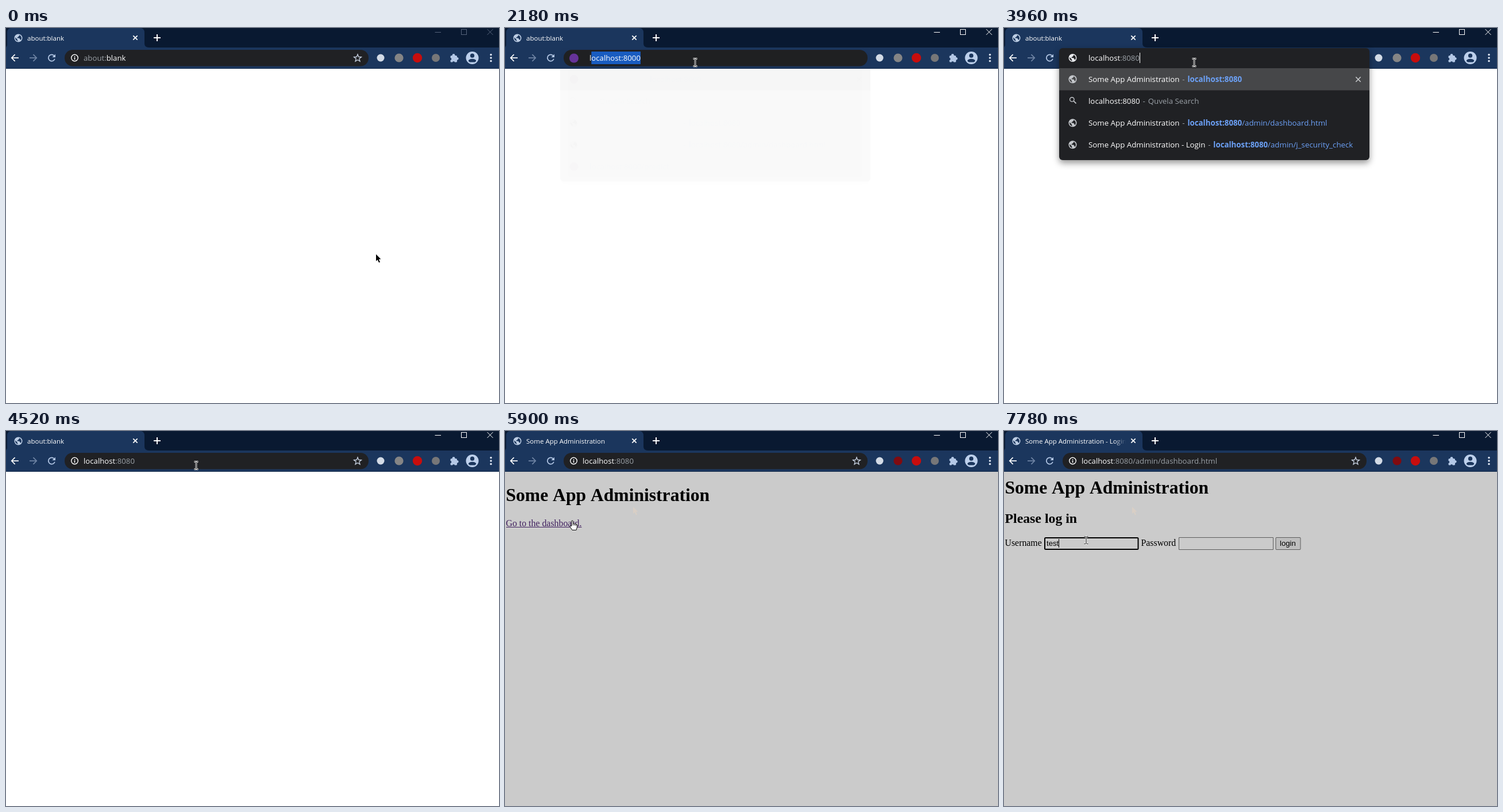
An HTML page with a canvas that plays this animation: 858 px wide and 653 px high, repeating every 8 s.

```html
<!DOCTYPE html>
<html lang="en">
<head>
<meta charset="utf-8">
<title>Browser login</title>
<style>
  html, body { margin: 0; width: 100%; height: 100%; overflow: hidden; background: #fff; }
  canvas { display: block; }
</style>
</head>
<body>
<canvas id="stage" width="858" height="653"></canvas>
<script>
const ctx = document.getElementById('stage').getContext('2d');
const LOOP = 8000;
const BAR = '#1b365d', DARK = '#202124', PAGE = '#cbcbcb';
const ICE = '#b4c8e6', GREY = '#9aa0a6', LINK = '#6ca1f7', PURPLE = '#663399';

const ui = (size, weight = 400) => `${weight} ${size}px "Open Sans", "Noto Sans", sans-serif`;
const serif = (size, weight = 400) => `${weight} ${size}px "Liberation Serif", serif`;
const sans = size => `${size}px "Liberation Sans", sans-serif`;
const URL_FONT = ui(13.2), ROW_FONT = ui(13.3), ROW_BOLD = ui(13.3, 700);

// ---- timeline ----
const ACTIVE = 300, SELECT = 1250, OPEN = 2180, FULL = 3960;
const ENTER = 4520, HOME = 4590, HOVER = 5740, LOGIN = 6300, FOCUS = 7200;
const KEYS = [[2180, 1], [2330, 2], [2500, 4], [2650, 5], [2970, 6], [3050, 7], [3130, 8],
  [3200, 9], [3430, 10], [3730, 11], [3810, 12], [FULL, 14]];
const USER_KEYS = [[7450, 1], [7530, 2], [7780, 4]];
const PATH = [[70, 644, 394], [860, 319, 67], [1100, 319, 67], [1250, 331, 60], [5280, 331, 60],
  [5440, 324, 58], [5740, 223, 132], [5900, 117, 156], [6690, 117, 156], [7150, 143, 190]];
const SHAPES = [[0, 'arrow'], [1170, 'beam'], [5480, 'arrow'], [5850, 'hand'], [6540, 'arrow'], [7000, 'beam']];

const latest = (list, t, none) => list.reduce((v, [at, val]) => t >= at ? val : v, none);
const clamp = v => Math.max(0, Math.min(1, v));

function pointer(t) {
  let i = PATH.findIndex(p => p[0] > t);
  if (i < 0) i = PATH.length;
  const a = PATH[Math.max(0, i - 1)], b = PATH[Math.min(i, PATH.length - 1)];
  let k = clamp((t - a[0]) / (b[0] - a[0] || 1));
  k = k * k * (3 - 2 * k);
  return [a[1] + (b[1] - a[1]) * k, a[2] + (b[2] - a[2]) * k];
}

// ---- drawing helpers ----
function text(s, x, y, color, font) {
  ctx.font = font;
  ctx.fillStyle = color;
  ctx.fillText(s, x, y);
  return x + ctx.measureText(s).width;
}
function box(x, y, w, h, color) {
  ctx.fillStyle = color;
  ctx.fillRect(x, y, w, h);
}
function round(x, y, w, h, r, color) {
  ctx.beginPath();
  ctx.roundRect(x, y, w, h, r);
  ctx.fillStyle = color;
  ctx.fill();
}
function disc(x, y, r, color) {
  ctx.beginPath();
  ctx.arc(x, y, r, 0, Math.PI * 2);
  ctx.fillStyle = color;
  ctx.fill();
}
function ring(x, y, r, color, width, from = 0, to = Math.PI * 2) {
  ctx.beginPath();
  ctx.arc(x, y, r, from, to);
  ctx.strokeStyle = color;
  ctx.lineWidth = width;
  ctx.stroke();
}
function shape(pts, x = 0, y = 0) {
  ctx.beginPath();
  for (let i = 0; i < pts.length; i += 2) ctx.lineTo(x + pts[i], y + pts[i + 1]);
}
function line(pts, color, width) {
  shape(pts);
  ctx.strokeStyle = color;
  ctx.lineWidth = width;
  ctx.stroke();
}
function cross(x, y, r, color, width) {
  line([x - r, y - r, x + r, y + r], color, width);
  line([x - r, y + r, x + r, y - r], color, width);
}

// ---- icons ----
function globe(x, y, color, land, scale = 1) {
  ctx.save();
  ctx.translate(x, y);
  ctx.scale(scale, scale);
  disc(0, 0, 7, color);
  ctx.fillStyle = land;
  shape([-5.6, -1.2, -2, 2, -1.6, 3.4, -0.6, 5.6, -3, 4.6, -5, 2.4]);
  ctx.fill();
  shape([1.4, -5.4, 4, -3.8, 5.4, -1, 5.2, 2, 3.8, 3.6, 2.6, 1.4, 1.6, 0.2, -2, 0, -1.6, -1.6, 0.2, -2, 0.4, -3.4, 1.8, -3.8]);
  ctx.fill();
  ctx.restore();
}
function info(x, y) {
  ring(x, y, 5.8, '#fff', 1.4);
  box(x - 0.8, y - 3, 1.6, 1.6, '#fff');
  box(x - 0.8, y - 0.6, 1.6, 3.8, '#fff');
}
function lens(x, y) {
  ring(x - 1.2, y - 1.4, 3.7, '#c4c7cb', 1.4);
  line([x + 1.6, y + 1.4, x + 6, y + 5.6], '#c4c7cb', 1.7);
}
function star(x, y) {
  ctx.beginPath();
  for (let i = 0; i < 10; i++) {
    const r = i % 2 ? 2.9 : 6.8, a = i * Math.PI / 5 - Math.PI / 2;
    ctx.lineTo(x + r * Math.cos(a), y + 0.6 + r * Math.sin(a));
  }
  ctx.closePath();
  ctx.strokeStyle = '#c8d2e2';
  ctx.lineWidth = 1.3;
  ctx.stroke();
}
function puzzle() {
  round(773.5, 48, 11.5, 11.5, 1.5, ICE);
  disc(779, 47.3, 2.4, ICE);
  disc(785.2, 53.3, 2.4, ICE);
  disc(773.4, 54, 1.9, BAR);
  disc(779, 59.8, 1.9, BAR);
}
function avatar() {
  disc(811.5, 52, 11, '#bdd0ec');
  disc(811.5, 48.2, 3.6, BAR);
  ctx.beginPath();
  ctx.ellipse(811.5, 57.4, 6.8, 3.6, 0, Math.PI, 0);
  ctx.lineTo(816, 59.5);
  ctx.lineTo(807, 59.5);
  ctx.fill();
}

// ---- browser window ----
function tabStrip(t) {
  box(0, 0, 858, 34, '#091931');
  ctx.beginPath();
  ctx.moveTo(0, 34);
  ctx.lineTo(2, 30);
  ctx.lineTo(2, 8);
  ctx.quadraticCurveTo(2, 0, 10, 0);
  ctx.lineTo(233, 0);
  ctx.quadraticCurveTo(241, 0, 241, 8);
  ctx.lineTo(241, 27);
  ctx.quadraticCurveTo(241, 34, 249, 34);
  ctx.fillStyle = BAR;
  ctx.fill();

  const shrunk = t >= HOME && t < HOME + 80 || t >= LOGIN && t < LOGIN + 80;
  globe(21.5, 17.5, '#bccde4', BAR, shrunk ? 0.85 : 1);
  const title = t < HOME ? 'about:blank' : 'Some App Administration' + (t < LOGIN ? '' : ' - Login');
  ctx.save();
  ctx.beginPath();
  ctx.rect(30, 0, 182, 34);
  ctx.clip();
  text(title, 37, 21.5, '#fff', ui(11.5));
  const fade = ctx.createLinearGradient(192, 0, 212, 0);
  fade.addColorStop(0, 'rgba(27,54,93,0)');
  fade.addColorStop(1, BAR);
  box(192, 5, 20, 25, fade);
  ctx.restore();

  cross(225, 17, 3.7, '#fff', 1.7);
  line([257, 17, 269, 17], '#fff', 2);
  line([263, 11, 263, 23], '#fff', 2);

  const tone = t < ACTIVE ? '#56637b' : '#fff';
  line([746.5, 7.5, 757, 7.5], tone, 1);
  ctx.strokeRect(792.5, 2.5, 9, 9);
  cross(842.5, 7, 5, tone, 1);
}

function toolbar(t) {
  box(0, 34, 858, 37, BAR);
  box(0, 70, 858, 1, '#142b4c');
  line([22, 52, 10, 52], '#fff', 1.7);
  line([15.6, 46.2, 9.8, 52, 15.6, 57.8], '#fff', 1.7);
  line([41, 52, 53, 52], '#7186a6', 1.7);
  line([47.4, 46.2, 53.2, 52, 47.4, 57.8], '#7186a6', 1.7);
  ring(79.5, 52, 5.6, ICE, 1.7, 0.3, 5.5);
  shape([86, 45.4, 86, 51, 80.4, 51]);
  ctx.fillStyle = ICE;
  ctx.fill();

  round(102, 38, 529, 28.5, 14, DARK);
  disc(652, 52, 6.5, '#d3dbe6');
  disc(684, 52, 7.6, t < HOME ? '#858585' : '#800b10');
  disc(716, 52, 8.2, '#c70d0d');
  disc(748, 52, 7, '#777778');
  puzzle();
  avatar();
  for (const y of [46.5, 52, 57.5]) disc(844, y, 1.7, '#e6edf7');
}

function address(t, typed) {
  const y = 57;
  if (t >= OPEN && t < ENTER) {
    if (typed === 14) {
      globe(119.5, 52, '#e8eaed', DARK);
      const x = text('localhost', 147, y, '#fff', URL_FONT);
      const end = text(':8080', x, y, GREY, URL_FONT);
      box(Math.round(end), 43, 1, 18, '#fff');
      return;
    }
    disc(120, 52.5, 8, PURPLE);
    const url = 'localhost:8000';
    ctx.font = URL_FONT;
    const start = 147 + ctx.measureText(url.slice(0, typed)).width;
    const end = 147 + ctx.measureText(url).width;
    box(start, 41, end - start, 22, '#195cc0');
    text(url, 147, y, '#fff', URL_FONT);
    return;
  }
  info(119.5, 52);
  star(612, 52);
  if (t < ENTER) {
    if (t >= SELECT) {
      ctx.font = URL_FONT;
      box(135, 41, ctx.measureText('about:blank').width, 22, '#195cc0');
    }
    const x = text('about:', 135, y, t < SELECT ? GREY : '#fff', URL_FONT);
    text('blank', x, y, '#fff', URL_FONT);
  } else {
    const x = text('localhost', 135, y, '#fff', URL_FONT);
    text(t < LOGIN ? ':8080' : ':8080/admin/dashboard.html', x, y, GREY, URL_FONT);
  }
}

// ---- suggestions ----
function suggestions(n) {
  const app = 'Some App Administration', base = 'localhost:8080';
  const home = { icon: 'globe', title: app, link: base };
  const dash = { icon: 'globe', title: app, link: base + '/admin/dashboard.html' };
  const login = { icon: 'globe', title: app + ' - Login', link: base + '/admin/j_security_check' };
  const search = { icon: 'lens', title: base.slice(0, n), note: 'Quvela Search' };
  if (n === 14) return [home, search, dash, login];
  const dev = { icon: 'dot', title: 'localhost:8000', hit: true, link: 'localhost:8000' };
  return [dev, search, home, n < 10 ? dash : login, { icon: 'dot', link: 'localhost:8000/predict' }];
}
function matched(s, n, x, y, color) {
  x = text(s.slice(0, n), x, y, color, ROW_BOLD);
  return text(s.slice(n), x, y, color, ROW_FONT);
}
function panel(t, typed) {
  const rows = suggestions(typed);
  const bottom = rows.length === 5 ? 267.5 : 230;
  ctx.save();
  ctx.globalAlpha = t < OPEN + 70 ? 0.015 : t < 2330 ? 0.6 : 1;
  ctx.shadowColor = 'rgba(0,0,0,0.42)';
  ctx.shadowBlur = 12;
  ctx.shadowOffsetY = 5;
  round(96, 35, 540, bottom - 35, 6, DARK);
  ctx.shadowColor = 'transparent';
  box(96, 70, 540, 38.5, '#464749');
  cross(616.5, 89.5, 4.2, '#c6c8ca', 1.6);
  rows.forEach((row, i) => {
    const mid = 89.3 + i * 38, y = mid + 4.7;
    if (row.icon === 'dot') disc(120, mid, 7.5, PURPLE);
    else if (row.icon === 'lens') lens(119.5, mid - 1.5);
    else globe(119.5, mid, '#c4c7cb', i ? DARK : '#464749');
    let x = 147;
    if (row.title) {
      x = row.hit ? matched(row.title, typed, x, y, '#fff') : text(row.title, x, y, '#fff', ROW_FONT);
      text('-', x + 4.8, y, GREY, ROW_FONT);
      x += 14;
    }
    if (row.note) text(row.note, x, y, GREY, ROW_FONT);
    else matched(row.link, typed, x, y, LINK);
  });
  ctx.restore();
}

// ---- web pages ----
function field(x, focused) {
  ctx.strokeStyle = focused ? '#000' : '#5c5c5c';
  ctx.lineWidth = focused ? 2 : 1;
  const w = focused ? 163 : 164;
  ctx.beginPath();
  if (focused) ctx.roundRect(x + 0.5, 186, w - 0.5, 20, 1.5);
  else ctx.rect(x, 185.5, w, 21);
  ctx.stroke();
}
function page(t) {
  box(0, 71, 858, 582, t < HOME ? '#fff' : PAGE);
  if (t < HOME) return;
  const login = t >= LOGIN;
  text('Some App Administration', 1.5, login ? 108.5 : 122, '#000', serif(31.6, 700));
  if (!login) {
    const end = text('Go to the dashboard.', 1.5, 166, '#40205f', serif(15.85));
    box(2, 167, end - 2, 1, '#40205f');
  } else {
    text('Please log in', 1.5, 160, '#000', serif(23.8, 700));
    text('Username', 1.5, 200, '#000', serif(15.85));
    text('Password', 238.5, 200, '#000', serif(15.85));
    field(70.5, t >= FOCUS);
    field(304.5, false);
    round(472.5, 185, 44, 22, 2, '#5c5c5c');
    round(473.5, 186, 42, 20, 1, '#bebebe');
    text('login', 480, 200, '#000', sans(13.2));
    if (t >= FOCUS) {
      const end = text('test'.slice(0, latest(USER_KEYS, t, 0)), 74, 200, '#000', sans(13.2));
      box(Math.round(end), 188, 1, 15, '#000');
    }
  }
  if (t >= HOVER) {
    arrowPath(223, 132);
    ctx.fillStyle = '#d9cfc5';
    ctx.fill();
  }
}

// ---- mouse pointer ----
function arrowPath(x, y) {
  shape([0, 0, 0, 12, 2.7, 9.6, 5, 14.6, 7, 13.7, 4.8, 8.8, 8.4, 8.6], x, y);
  ctx.closePath();
}
function beam(x, y) {
  const parts = [[-3.5, -6.5, -1, -6.5, 0, -5.5, 1, -6.5, 3.5, -6.5],
    [0, -5.5, 0, 5.5], [-3.5, 6.5, -1, 6.5, 0, 5.5, 1, 6.5, 3.5, 6.5]];
  for (const [color, width] of [['#f2f2f2', 2.8], ['#111', 1]]) {
    for (const p of parts) line(p.map((v, i) => v + (i % 2 ? y : x)), color, width);
  }
}
function hand(x, y) {
  ctx.save();
  ctx.translate(x, y);
  ctx.beginPath();
  ctx.moveTo(-1.2, 9.5);
  ctx.lineTo(-1.2, 0.8);
  ctx.quadraticCurveTo(0, -1, 1.4, 0.8);
  ctx.lineTo(1.4, 5.6);
  ctx.quadraticCurveTo(3, 4.4, 4, 6);
  ctx.quadraticCurveTo(5.6, 5, 6.4, 6.6);
  ctx.quadraticCurveTo(8.4, 6, 8.6, 8);
  ctx.lineTo(8.4, 12);
  ctx.lineTo(7, 16.5);
  ctx.lineTo(0, 16.5);
  ctx.lineTo(-4, 10.5);
  ctx.quadraticCurveTo(-3.6, 8, -1.2, 9.5);
  ctx.closePath();
  ctx.fillStyle = '#fff';
  ctx.fill();
  ctx.strokeStyle = '#000';
  ctx.lineWidth = 1;
  ctx.stroke();
  line([1.4, 5.6, 1.4, 8.5], '#000', 0.9);
  line([4, 6, 4, 8.8], '#000', 0.9);
  line([6.4, 6.6, 6.4, 9], '#000', 0.9);
  ctx.restore();
}
function drawPointer(t) {
  const [x, y] = pointer(t), kind = latest(SHAPES, t, 'arrow');
  if (kind === 'beam') return beam(x, y);
  if (kind === 'hand') return hand(x, y);
  arrowPath(x, y);
  ctx.strokeStyle = '#fff';
  ctx.lineWidth = 1.6;
  ctx.stroke();
  ctx.fillStyle = '#000';
  ctx.fill();
}

function draw(now) {
  const t = now % LOOP;
  const typed = latest(KEYS, t, 0);
  page(t);
  tabStrip(t);
  toolbar(t);
  if (t >= OPEN && t < ENTER) panel(t, typed);
  address(t, typed);
  drawPointer(t);
}

const start = performance.now();
function tick() {
  draw(performance.now() - start);
  requestAnimationFrame(tick);
}
tick();
</script>
</body>
</html>
```
